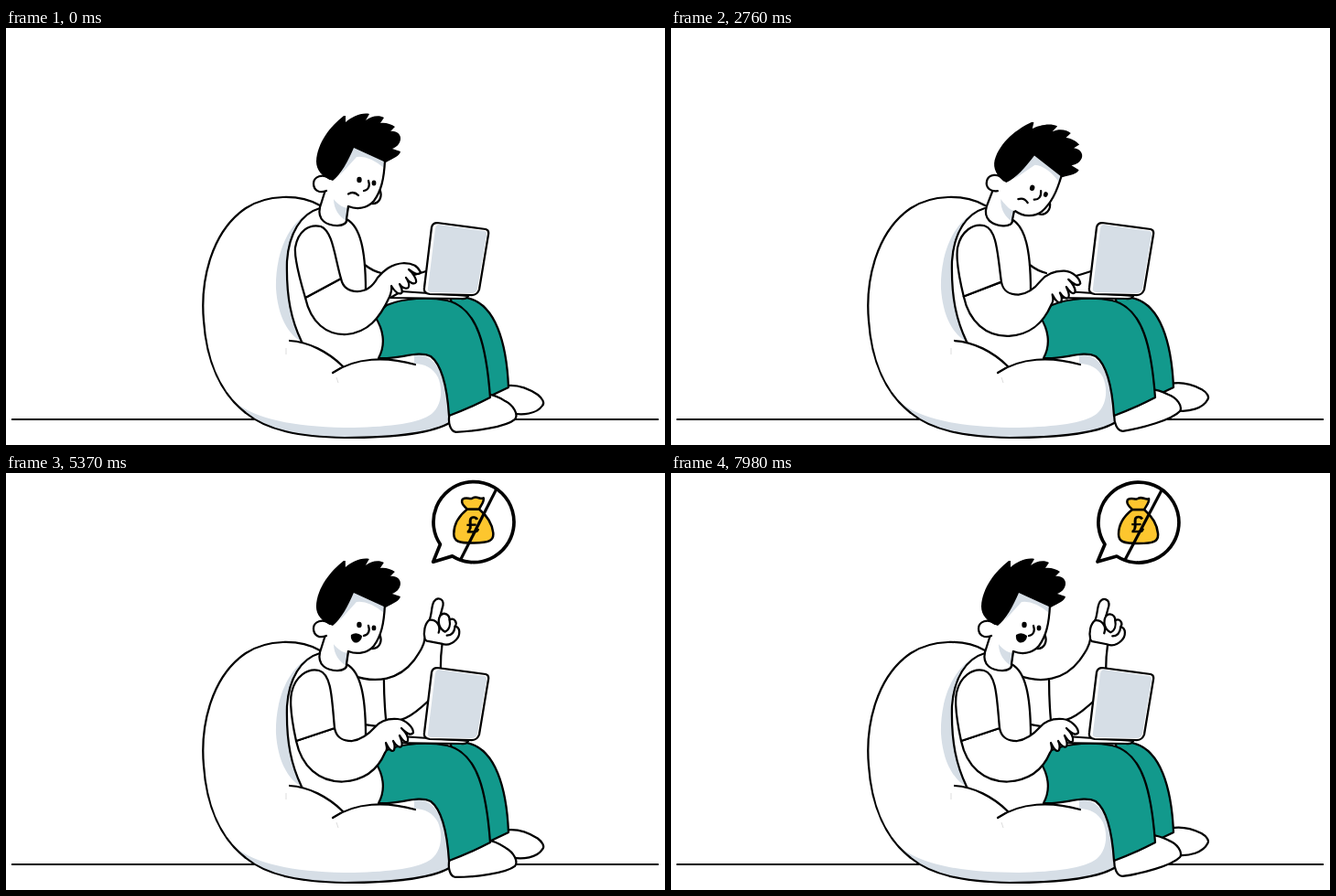
These frames come from a looping animation (720 px wide and 456 px high, 8 s). An HTML page:

```html
<!DOCTYPE html>
<html lang="en">
<head>
<meta charset="utf-8">
<title>Beanbag laptop</title>
<style>
  html, body { margin: 0; width: 100%; height: 100%; overflow: hidden; background: #fff; }
  svg { display: block; width: 720px; height: 456px; }
  .l, .w, .t { stroke: #000; stroke-width: 2.25; stroke-linecap: round; stroke-linejoin: round; }
  .l { fill: none; }
  .w { fill: #fff; }
  .t { fill: #12998c; }
  .p { fill: #fff; }
  .g { fill: #d6dee6; }
  .y { fill: #fdc62e; stroke: #000; stroke-width: 2.5; stroke-linejoin: round; }
</style>
</head>
<body>
<svg viewBox="0 0 720 456">
  <path d="M6 428H713" stroke="#000" stroke-width="2"/>
  <path id="farShoe" class="w" d="M530 396 L548 391 C560 390 572 395 581 401 C586 405 589 410 586 413 C580 422 564 424 552 421 L530 412 Z"/>

  <!-- beanbag -->
  <path class="p" d="M343 194 C320 181 285 182 262 197 C225 222 212 275 216 320 C219 365 235 400 262 421 C285 440 320 447 370 448 C420 448 465 444 486 431 L484 400 L470 357 L400 340 Z"/>
  <path class="g" d="M250 409 C275 429 320 437 380 437 C420 436 452 432 465 422 C477 412 477 394 472 382 C467 372 457 367 446 367 L446 358 C466 355 481 372 484 424 L486 431 C465 444 420 448 370 448 C315 447 276 438 250 409 Z"/>
  <path class="g" d="M334 200 C304 215 294 255 295 285 C297 315 308 335 323 343 L318 240 Z"/>
  <path class="l" d="M343 194 C320 181 285 182 262 197 C225 222 212 275 216 320 C219 365 235 400 262 421 C285 440 320 447 370 448 C420 448 465 444 486 431"/>
  <path d="M306 350V357M361 382L363 388" stroke="#ddd" stroke-width="1" fill="none"/>

  <g id="farArm">
    <path class="p" d="M378 221 C405 231 430 226 446 205 C453 195 457 189 458 181 L477 186 L475 214 L464 247 C452 258 440 268 430 271 L390 276 Z"/>
    <path class="l" d="M378 221 C405 231 430 226 446 205 C453 195 457 189 458 181 M477 186 Q475 200 475 216 M466 245 C452 259 440 268 431 270 M413 226 Q413 248 415 270 M392 275 L405 277"/>
    <path class="w" d="M458 182 C456 174 458 165 463 161 C466 154 465 146 468 141 C472 135 479 138 478 145 L475 156 C479 152 485 155 485 161 C490 158 494 164 491 168 C497 169 497 178 492 183 C487 188 481 189 476 187 L460 184 Z"/>
    <path class="l" d="M463 161 C470 160 476 167 473 175 M475 156 C471 163 474 171 480 174 C485 172 486 166 485 161 M491 168 Q490 178 482 178"/>
  </g>

  <!-- body and legs -->
  <path class="p" d="M343 197 C322 203 309 225 307 255 C306 295 312 320 323 343 C345 349 358 360 368 370 C385 364 400 364 408 361 C416 345 412 330 404 316 L393 288 C393 245 390 218 372 209 Z"/>
  <path class="l" d="M343 197 C322 203 309 225 307 255 C306 295 312 320 323 343 M372 209 C387 217 393 242 393 288 M310 342 C330 343 352 354 368 370"/>
  <path id="farHand" class="l" d="M392 259 Q401 266 410 268 M436 273 Q450 269 462 265"/>
  <path class="t" d="M485 295 L503 295 C535 301 547 345 549 393 L528 403 Z"/>
  <path id="nearShoe" class="w" d="M485 420 C482 432 485 441 491 442 C512 442 546 438 556 430 C560 425 555 415 546 410 C539 405 530 400 520 402 Z"/>
  <path class="t" d="M400 318 L416 303 C435 295 462 294 482 298 C516 306 525 350 529 404 Q508 415 484 424 C482 393 477 369 464 359 C450 352 428 363 407 361 C416 345 411 328 404 317 Z"/>
  <path class="p" d="M357 377 C382 360 415 359 447 368 L430 380 Z"/>
  <path class="l" d="M357 377 C382 360 415 359 447 368"/>

  <!-- laptop -->
  <path class="w" d="M432 288 L505 293 Q503 297 497 296 L420 295 Z"/>
  <path class="w" d="M471 213 L524 220 Q528 221 527 226 L517 286 Q515 292 509 292 L463 291 Q456 290 457 284 L465 218 Q466 213 471 213 Z"/>
  <path class="g" d="M473 215 L523 222 Q526 223 525 227 L515 285 Q514 290 508 290 L465 289 Q460 289 461 284 L469 219 Q470 215 473 215 Z"/>

  <path id="arm" class="w"/>
  <path id="sleeve" class="w"/>

  <g id="neck">
    <path class="p" d="M349 176 L343 197 C340 210 350 216 362 216 C368 216 372 213 372 209 L374 195 Z"/>
    <path class="g" d="M358 187 C363 194 370 197 375 197 L372 211 C365 207 358 199 358 187 Z"/>
    <path class="l" d="M349 177 L343 196 C340 210 350 216 362 216 C369 216 373 213 372 209 L374 195"/>
  </g>
  <g id="head">
    <path class="w" d="M408 176 C412 184 408 193 399 192 Z"/>
    <path class="p" d="M350 164 L352 176 L359 188 C366 195 371 195 374 195 C384 199 395 197 402 189 C410 178 413 165 414 145 L380 130 Z"/>
    <path class="g" d="M380 130 L414 146 L413 153 Q396 139 383 141 L364 162 Z"/>
    <path class="l" d="M374 195 C384 199 395 197 402 189 C410 178 413 165 414 145"/>
    <path class="w" d="M354 165 C346 158 336 163 336 170 C336 178 343 181 350 178"/>
    <path d="M357 167 C345 163 339 155 339 146 C340 125 355 107 369 96 L371 96 L371 103 C377 98 388 92 397 94 L393 101 C399 96 408 95 413 98 L409 104 C414 103 421 105 425 108 L420 113 C426 112 432 116 431 122 C430 127 427 130 422 132 L431 135 C430 140 424 142 415 147 L380 131 C374 145 366 160 357 167 Z"/>
    <ellipse cx="386" cy="166" rx="2.7" ry="3.2"/>
    <ellipse cx="402" cy="169.5" rx="2.4" ry="2.9"/>
    <path class="l" d="M396 167 C398 173 396 177 391 178"/>
    <path id="sad" class="l" d="M374 181.5 C378 179 382 180 385 183"/>
    <path id="open" d="M377 177 Q383 173 389 178 C389 183 384 187 380 185 Q376 182 377 177 Z"/>
  </g>

  <g id="bubble">
    <path d="M474 78 A44 44 0 1 1 487 91 L466 97 Z" fill="#fff" stroke="#000" stroke-width="3.7" stroke-linejoin="round"/>
    <path class="y" d="M504 40 C495 47 489 56 489 67 C489 75 494 77 511 77 C527 77 533 75 532 66 C531 55 524 46 517 40 Z"/>
    <path class="y" d="M504 40 C500 36 497 33 499 29 C504 26 507 30 510 28 C515 25 518 30 522 28 C523 32 519 36 517 40 Z"/>
    <text x="510" y="65.5" font-family="'Liberation Sans', Arial, sans-serif" font-size="25" text-anchor="middle" stroke="#000" stroke-width="0.7">£</text>
    <path d="M537 17 L496 95" stroke="#000" stroke-width="3.2"/>
  </g>
</svg>
<script>
const LOOP = 8000, STEP = 752;
const $ = id => document.getElementById(id);
const set = (id, name, value) => $(id).setAttribute(name, value);
const show = (id, on) => set(id, 'visibility', on ? 'visible' : 'hidden');
const turn = (id, a, x, y) => set(id, 'transform', `rotate(${a} ${x} ${y})`);

const part = (t, a, b) => Math.min(1, Math.max(0, (t - a) / (b - a)));
const ease = (t, a, b) => { const x = part(t, a, b); return x * x * (3 - 2 * x); };
const back = (t, a, b) => { const x = part(t, a, b) - 1; return 1 + 2.2 * x ** 3 + 1.2 * x * x; };
const wave = x => (1 - Math.cos(2 * Math.PI * x)) / 2;

// Blend two paths with the same commands
function mix(a, b, k) {
  const to = b.match(/[\d.]+/g);
  let i = 0;
  return a.replace(/[\d.]+/g, n => (+n + (to[i++] - n) * k).toFixed(2));
}

const arm = [
  'M327 295 C333 322 350 336 372 335 C395 333 408 318 419 294 C421 289 422 286 421 282 C424 287 428 292 432 290 C434 288 432 284 430 280 C433 285 439 286 440 283 C441 280 439 276 437 273 C441 279 446 281 448 278 C449 275 444 267 440 264 C445 268 451 271 453 267 C450 260 443 257 435 257 C420 258 412 266 406 273 C400 284 392 288 384 288 C374 288 368 284 366 274 Z',
  'M317 293 C323 321 342 338 368 337.5 C392 336 406 325 414 306 C417 302 416 300 415 295 C418 301 421 306 424 303 C425 300 425 297 423 293 C426 298 430 301 432 299 C434 296 432 292 430 287 C434 293 437 296 439 293 C440 289 436 283 432 279 C437 284 442 288 445 284 C445 278 437 270 428 269 C416 268 408 272 403 278 C394 288 386 292 378 293 C368 293 361 290 359 279 Z'
];
const sleeve = [
  'M327 295 C319 268 315 250 316 240 C319 222 331 214 344 217 C357 222 359 250 366 274 Z',
  'M317 293 C312 270 310 250 312 240 C316 222 330 213 342 216 C356 220 356 248 359 279 Z'
];

function draw(t) {
  turn('farShoe', -9 * wave(t / STEP), 530, 408);
  turn('nearShoe', -9 * wave(t / STEP - 0.2) ** 1.5, 485, 424);

  const k = 0.75 * (ease(t, 150, 550) - ease(t, 900, 1350) + ease(t, 2450, 2800))
    + 0.25 * ease(t, 3300, 4100);
  set('arm', 'd', mix(...arm, k));
  set('sleeve', 'd', mix(...sleeve, k));

  // After the idea arrives everything settles with one shared decay
  const rest = Math.exp(-Math.max(0, t - 4410) / 450) * part(t, 4150, 4410);

  const raise = back(t, 3720, 4180);
  show('farArm', t > 3720);
  show('farHand', t <= 3780);
  turn('farArm', 75 * (1 - raise) - 1.6 * rest + 0.2 * Math.sin(t / 240) * part(t, 4410, 5200), 400, 250);

  const tilt = ease(t, 150, 800) - ease(t, 4080, 4380);
  turn('head', 13.5 * tilt - 0.7 * rest, 353, 207);
  turn('neck', 3.5 * tilt, 358, 225);
  show('sad', t < 4200);
  show('open', t >= 4200);

  show('bubble', t > 4090);
  set('bubble', 'transform',
    `translate(${0.5 * rest} ${-4 * rest}) rotate(${-7 * rest} 510 53) ` +
    `translate(466 97) scale(${Math.max(0, back(t, 4080, 4390))}) translate(-466 -97)`);
}

const start = performance.now();
function tick() {
  draw((performance.now() - start) % LOOP);
  requestAnimationFrame(tick);
}
tick();
</script>
</body>
</html>
```
